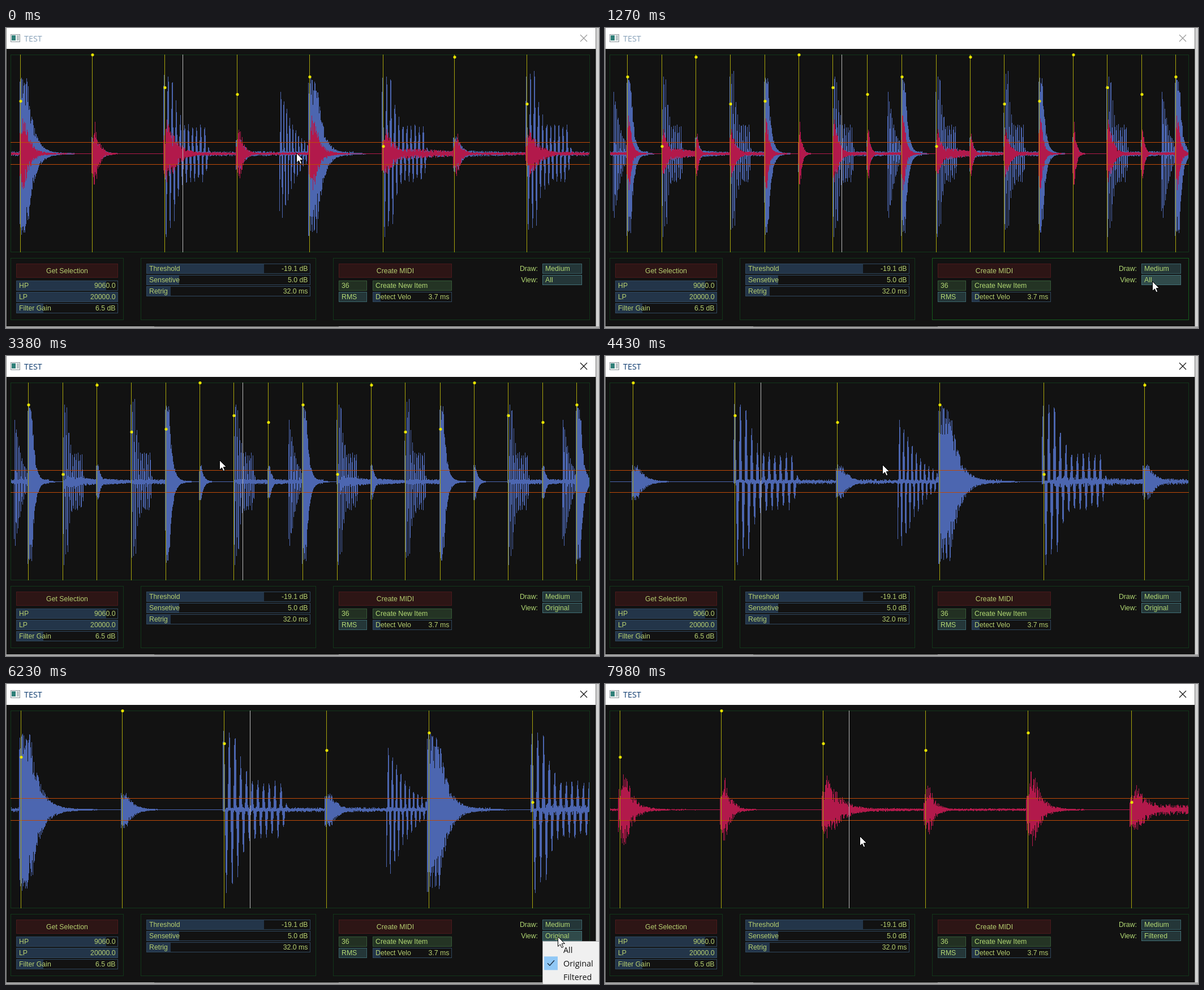
Recreate the animation shown at these times as an HTML page with a canvas. Size 1048 by 531 pixels, loop 8 s.

```html
<!DOCTYPE html>
<html lang="en">
<head>
<meta charset="utf-8">
<title>TEST</title>
<style>
html, body { margin: 0; width: 1048px; height: 531px; overflow: hidden; background: #121212; }
canvas { display: block; }
</style>
</head>
<body>
<canvas id="stage" width="1048" height="531"></canvas>
<script>
const g = document.getElementById('stage').getContext('2d');
const LOOP = 8000, LEFT = 9, RIGHT = 1031, ZERO = 222;
const UI_FONT = '12.3px "Liberation Sans", Arial, sans-serif';
const WINDOW_FONT = '14.4px "Open Sans", "Noto Sans", sans-serif';
const BLUE = '#4c66b0', RED = '#b2194b', YELLOW = '#a8a40c', ORANGE = '#c04a08';
const GREEN = '#12361a', LIME = '#b6cf70', SKY = '#90c8f6';
const MODES = ['All', 'Original', 'Filtered'];

// ---- Sound: an eight-beat loop of decaying bursts ----
const RES = 360, COUNT = 8 * RES, PLAYHEAD = 2.2403;

// Steady for a while, then dies away
const burst = (t, level, hold, decay) => level * Math.exp(-Math.max(0, t - hold) / decay);

const SOUNDS = {
  kick: {
    low: t => burst(t, 128, .1, .085) + burst(t, 7, 0, .28),
    high: t => burst(t, 72, .05, .075) + burst(t, 3, 0, .3)
  },
  hat: {
    low: t => burst(t, 30, .04, .075),
    high: t => burst(t, 66, .03, .065)
  },
  snare: {
    period: .056, peak: .105,
    low: t => burst(t, 90, .12, .05) + burst(t, 62 - 20 * t, .57, .025),
    high: t => burst(t, 66, .03, .14)
  },
  tom: {
    period: .041, peak: .044,
    low: t => t < .39 ? burst(t, 116, .05, .18) : 0,
    high: () => 0
  }
};

const HITS = [
  { beat: 0, sound: 'kick', accent: 1, tail: 1, dotY: 129 },
  { beat: .991, sound: 'hat', accent: 1, tail: .5, dotY: 47 },
  { beat: 1.987, sound: 'snare', accent: 1, tail: 5, dotY: 105 },
  { beat: 2.988, sound: 'hat', accent: .78, tail: 6, dotY: 117 },
  { beat: 3.588, sound: 'tom', accent: 1, tail: 0 },
  { beat: 3.988, sound: 'kick', accent: 1.12, tail: .5, dotY: 86 },
  { beat: 5.002, sound: 'snare', accent: .75, tail: 13, dotY: 209 },
  { beat: 5.988, sound: 'hat', accent: .7, tail: 7, dotY: 51 },
  { beat: 6.985, sound: 'snare', accent: .76, tail: 5, dotY: 134 }
];

let seed = 12345;
function random() {
  seed = (seed * 1664525 + 1013904223) % 4294967296;
  return seed / 4294967296;
}

const wave = () => ({ up: new Float32Array(COUNT), down: new Float32Array(COUNT) });
const low = wave(), high = wave();

function raise({ up, down }, i, above, below) {
  up[i] = Math.max(up[i], above);
  down[i] = Math.max(down[i], below);
}

for (let i = 0; i < COUNT; i++) {
  for (const { beat, sound, accent, tail } of HITS) {
    let t = i / RES - beat;
    if (t > 7.9) t -= 8;
    if (t < -.016 || t > 1) continue;
    const a = random(), b = random(), c = random(), d = random();
    const { period, peak, low: lowLevel, high: highLevel } = SOUNDS[sound];
    const body = lowLevel(t), bright = highLevel(t) * accent;
    if (period) {
      const swing = Math.cos(2 * Math.PI * (t - peak) / period) * body * (.75 + .25 * a);
      raise(low, i, Math.max(swing, 4 * c * c), Math.max(-swing, 4 * d * d));
    } else {
      raise(low, i, body * (.5 + .5 * a), body * 1.08 * (.5 + .5 * b));
    }
    const attack = Math.min(1, .6 + 10 * Math.max(0, t));
    raise(high, i, bright * attack * (.35 + .65 * c * c), bright * attack * (.35 + .65 * d * d));
    if (t > .1) {
      const fade = tail * (1 - .65 * t), soft = sound === 'snare' ? fade : Math.min(fade, 2);
      raise(low, i, fade * (.2 + .7 * a * a), fade * (.2 + .7 * b * b));
      raise(high, i, soft * (.2 + .8 * c * c), soft * (.2 + .8 * d * d));
    }
  }
}

// ---- Timeline ----
// Each move glides in a few visible jumps to its end point
const JUMP = 250;
const MOVES = [
  { at: 0, jumps: 1, x: 513, y: 221 },
  { at: 760, jumps: 3, x: 967, y: 448 },
  { at: 2550, jumps: 2, x: 1033, y: 498 },
  { at: 3380, jumps: 1, x: 377, y: 184 },
  { at: 3630, jumps: 1, x: 355, y: 179 },
  { at: 3880, jumps: 2, x: 490, y: 192 },
  { at: 5230, jumps: 1, x: 912, y: 333 },
  { at: 5480, jumps: 2, x: 975, y: 447 },
  { at: 6480, jumps: 2, x: 1009, y: 518 },
  { at: 7730, jumps: 2, x: 450, y: 269 }
];
// Origin is the x of beat zero, scale the pixels per beat
const VIEWS = [
  { at: 0, origin: 25.5, scale: 128.1 },
  { at: 260, origin: 178, scale: 88 },
  { at: 510, origin: 282.5, scale: 60.58 },
  { at: 4430, origin: -129.3, scale: 180.8 },
  { at: 5230, origin: 26, scale: 180.8 }
];
const ACTIVATE = 1520, MENU_OPENS = [1770, 5980], MENU_PICKS = [3110, 7480];

const current = (steps, t) => steps.filter(step => step.at <= t).pop();

function pointerAt(t) {
  const move = current(MOVES, t);
  const from = MOVES[MOVES.indexOf(move) - 1] || move;
  const p = Math.min(1, (Math.floor((t - move.at) / JUMP) + 1) / move.jumps);
  const eased = 1 - (1 - p) ** 2;
  return { x: from.x + (move.x - from.x) * eased, y: from.y + (move.y - from.y) * eased };
}

// ---- Drawing ----
function fill(color, x, y, w, h) {
  g.fillStyle = color;
  g.fillRect(x, y, w, h);
}

function box(x, y, w, h, border, inside) {
  if (inside) fill(inside, x, y, w, h);
  g.strokeStyle = border;
  g.lineWidth = 1;
  g.strokeRect(x + .5, y + .5, w - 1, h - 1);
}

function text(string, x, y, color = LIME, align = 'left', font = UI_FONT) {
  g.font = font;
  g.textAlign = align;
  g.fillStyle = color;
  g.fillText(string, x, y);
}

function path(points, x, y) {
  g.beginPath();
  points.forEach(([dx, dy]) => g.lineTo(x + dx, y + dy));
}

function button(label, x, w) {
  box(x, 417, w, 25, '#4a1a1c', '#2d1515');
  text(label, x + w / 2, 434, LIME, 'center');
}

function slider(label, value, x, y, w, filled) {
  fill('#233549', x, y, filled, 18);
  box(x, y, w, 18, '#30485e');
  text(label, x + 5, y + 13);
  text(value, x + w - 4.5, y + 13, LIME, 'right');
}

function choice(label, x, y, w, border = '#3a646a', inside = '#243638') {
  box(x, y, w, 18, border, inside);
  text(label, x + 5, y + 13, '#b2d873');
}

function drawWindow(active) {
  fill('#121212', 0, 0, 1048, 531);
  fill('#fff', 0, 0, 1043, 37);
  fill('#8a8a8a', 0, 0, 1, 531);
  fill('#d2d2d2', 1043, 0, 5, 531);
  fill('#777', 1042, 0, 1, 528);
  fill('#a2a2a2', 0, 528, 1048, 3);
  fill('#666', 262, 528, 326, 1);
  box(8, 11, 17, 14, '#8c979c', '#f2f4f4');
  fill('#2f7f78', 10, 13, 7, 9);
  fill('#b9c4c6', 19, 13, 4, 9);
  text('TEST', 32, 24, active ? '#0b3a6e' : '#86a0b8', 'left', WINDOW_FONT);
  g.strokeStyle = active ? '#111' : '#999';
  g.lineWidth = 1.2;
  g.beginPath();
  g.moveTo(1015, 12); g.lineTo(1027, 24);
  g.moveTo(1027, 12); g.lineTo(1015, 24);
  g.stroke();
}

function drawWave({ up, down }, color, origin, scale) {
  g.fillStyle = color;
  for (let x = LEFT; x < RIGHT; x++) {
    const first = Math.floor((x - origin) / scale * RES);
    const last = Math.max(first + 1, Math.floor((x + 1 - origin) / scale * RES));
    let top = 0, bottom = 0;
    for (let i = first; i < last; i++) {
      const k = (i % COUNT + COUNT) % COUNT;
      top = Math.max(top, up[k]);
      bottom = Math.max(bottom, down[k]);
    }
    top = Math.round(top);
    g.fillRect(x, ZERO - top, 1, top + Math.round(bottom) + 1);
  }
}

function drawMarker(x, dotY) {
  if (x < LEFT || x > RIGHT) return;
  fill(YELLOW, x, 47, 1, 350);
  g.fillStyle = '#e8e400';
  g.beginPath();
  g.arc(x + 1, dotY + .5, 2.6, 0, 7);
  g.fill();
}

function drawGraph(mode, { origin, scale }) {
  box(8, 47, 1024, 350, GREEN);
  if (mode !== 2) drawWave(low, BLUE, origin, scale);
  if (mode !== 1) drawWave(high, RED, origin, scale);
  fill(ORANGE, LEFT - 1, 202, 1024, 1);
  fill(ORANGE, LEFT - 1, 241, 1024, 1);
  for (let start = -8; start <= 8; start += 8) {
    for (const { beat, dotY } of HITS) {
      if (dotY) drawMarker(Math.floor(origin + (start + beat) * scale), dotY);
    }
  }
  fill('#b8b8b8', Math.floor(origin + PLAYHEAD * scale), 47, 1, 350);
}

function drawControls(mode, overPanel, overView) {
  box(8, 407, 200, 110, GREEN);
  box(238, 407, 310, 110, GREEN);
  box(578, 407, 454, 110, overPanel ? '#145a1c' : GREEN);
  button('Get Selection', 18, 180);
  slider('HP', '9060.0', 18, 447, 180, 159);
  slider('LP', '20000.0', 18, 467, 180, 180);
  slider('Filter Gain', '6.5 dB', 18, 487, 180, 48);
  slider('Threshold', '-19.1 dB', 248, 417, 290, 208);
  slider('Sensetive', '5.0 dB', 248, 437, 290, 58);
  slider('Retrig', '32.0 ms', 248, 457, 290, 43);
  button('Create MIDI', 588, 200);
  choice('36', 588, 447, 50, '#365a38', '#223022');
  choice('Create New Item', 648, 447, 140, '#365a38', '#243424');
  choice('RMS', 588, 467, 50);
  slider('Detect Velo', '3.7 ms', 648, 467, 140, 14);
  text('Draw:', 940, 430, '#b2d873', 'right');
  text('View:', 940, 450, '#b2d873', 'right');
  choice('Medium', 948, 417, 70);
  choice(MODES[mode], 948, 437, 70, '#427076', overView ? '#304a4a' : '#243638');
}

function drawMenu(mode, pointerY, opacity) {
  const rowY = row => 458 + row * 24.3;
  const hovered = Math.floor((pointerY - rowY(0)) / 24.3);
  g.globalAlpha = opacity;
  box(948, 455, 110, 90, '#a8a8a8', '#f0f0f0');
  if (hovered >= 0) fill(SKY, 951, rowY(hovered), 97, 24);
  fill(SKY, 951, rowY(mode), 24, 24);
  path([[6, 12], [10, 16], [18, 7]], 951, rowY(mode));
  g.strokeStyle = '#1c2c40';
  g.lineWidth = 1.4;
  g.stroke();
  MODES.forEach((name, i) => text(name, 985, rowY(i) + 17.5, '#111', 'left', WINDOW_FONT));
  g.globalAlpha = 1;
}

function drawPointer(x, y) {
  path([[0, 0], [0, 17], [4, 13.3], [6.6, 19.2], [9.2, 18], [6.7, 12.2], [12, 12]], x + .5, y + .5);
  g.closePath();
  g.fillStyle = '#fff';
  g.strokeStyle = '#000';
  g.lineWidth = 1;
  g.fill();
  g.stroke();
}

function draw(now) {
  const t = now % LOOP;
  const mode = MENU_PICKS.filter(pick => pick <= t).length;
  const opened = MENU_OPENS[mode];
  const open = t >= opened;
  const { x, y } = pointerAt(t);
  const overPanel = !open && x > 578 && x < 1032 && y > 407 && y < 517;
  const overView = open || (overPanel && x >= 948 && x < 1018 && y >= 437 && y < 455);
  drawWindow(t >= ACTIVATE);
  drawGraph(mode, current(VIEWS, t));
  drawControls(mode, overPanel, overView);
  if (open) drawMenu(mode, y, t < opened + JUMP ? .6 : 1);
  drawPointer(Math.round(x), Math.round(y));
}

const start = performance.now();
function tick() {
  draw(performance.now() - start);
  requestAnimationFrame(tick);
}
tick();
</script>
</body>
</html>
```
